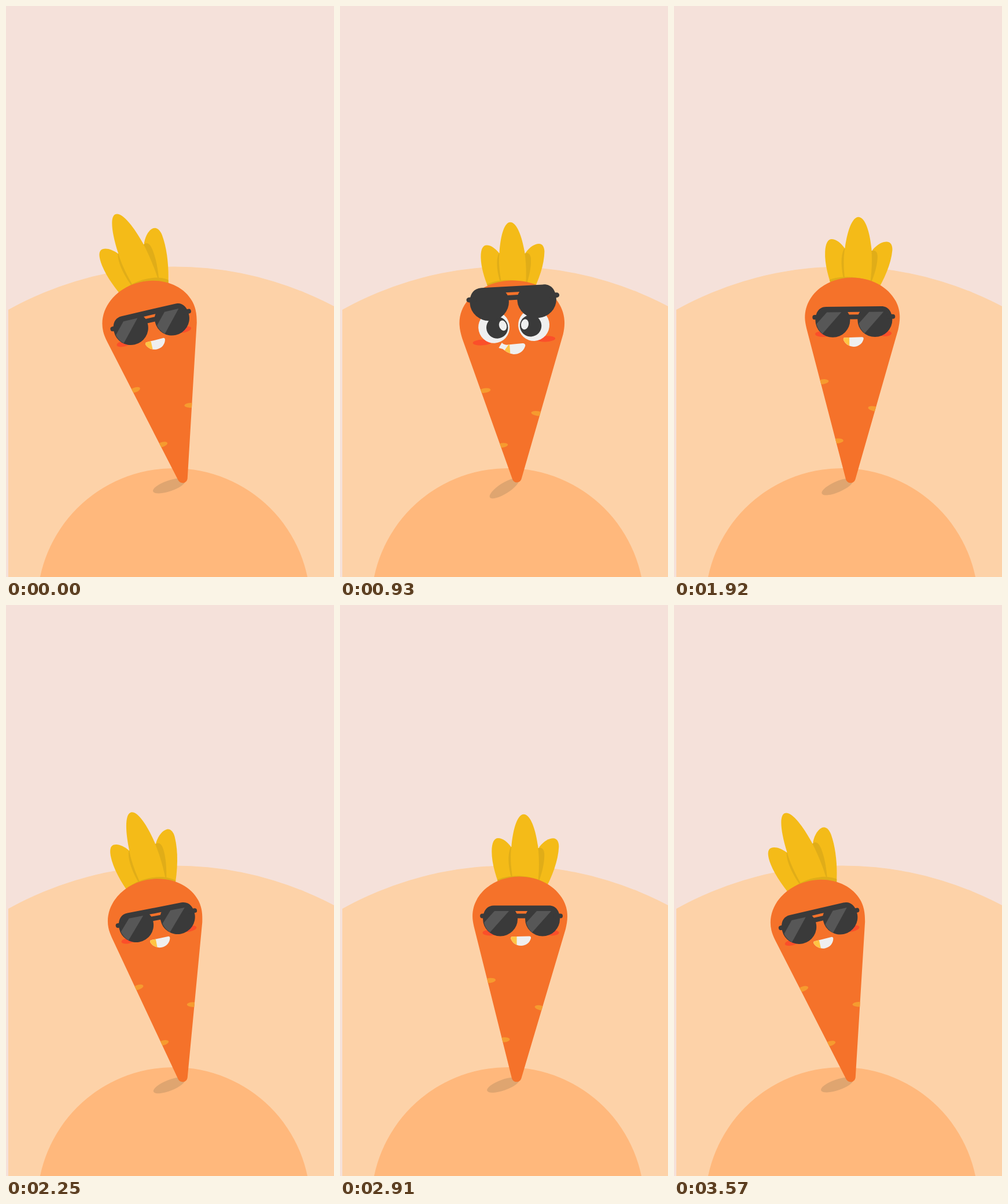
Animation, 567 px wide and 987 px high, one loop 3.6 s. Source, as an HTML page:

```html
<!DOCTYPE html>
<html lang="en">
<head>
<meta charset="utf-8">
<title>Dancing carrot</title>
<style>
  html, body { margin: 0; width: 100%; height: 100%; overflow: hidden; background: #f5e1da; }
  svg { display: block; width: 100vw; height: 100vh; }
</style>
</head>
<body>
<svg viewBox="0 0 567 987">
  <defs>
    <clipPath id="bodyClip"><path class="body"/></clipPath>
    <clipPath id="mouthClip"><path class="mouth"/></clipPath>
    <clipPath id="leafClip">
      <path id="leafL" d="M280 497C270 472 262 446 262 424C262 408 266 400 273 400C281 400 289 407 295 415C300 425 303 460 302 497Z"/>
      <path id="leafR" d="M340 497L344 416C352 405 361 400 368 400C375 400 378 407 378 415C377 440 367 469 352 497Z"/>
      <path id="leafM" d="M303 497C294 455 294 430 296 415C299 380 307 357 317 357C329 357 338 385 342 415C345 445 344 470 340 497Z"/>
    </clipPath>
    <clipPath id="hillClip"><path d="M4 0H567V987H4Z"/></clipPath>
    <g id="eye">
      <ellipse rx="27" ry="27.5" fill="#efefef"/>
      <circle cx="5.5" cy="1" r="18.7" fill="#3a3a3a"/>
      <ellipse cx="15.5" cy="-2" rx="6.5" ry="9" transform="rotate(-14 15.5 -2)" fill="#efefef"/>
    </g>
  </defs>

  <path fill="#f5e1da" d="M0 0H567V987H0Z"/>
  <circle cx="291" cy="1040.5" r="590" fill="#fdd2a8" clip-path="url(#hillClip)"/>
  <circle cx="290" cy="1035" r="236" fill="#ffb87c"/>
  <ellipse id="shadow" cx="-20" rx="29.5" ry="9.3" fill="#dfa570"/>

  <g id="carrot">
    <g id="leaves">
      <g fill="#f4bb18">
        <use href="#leafL"/>
        <use href="#leafR"/>
      </g>
      <g fill="#e0ad18">
        <path d="M295 416C289 428 290 452 298 478L302 478L298 415Z"/>
        <path d="M341 418C349 415 353 420 353 430C353 446 349 461 344 477L340 478Z"/>
      </g>
      <use href="#leafM" fill="#f4bb18"/>
      <path clip-path="url(#leafClip)" fill="#e0ad18" d="M262 481C282 465 318 465 342 474C352 478 360 484 366 492V500H262Z"/>
    </g>
    <path class="body" fill="#f5722a"/>
    <g clip-path="url(#bodyClip)">
      <g id="marks" fill="#f69b2f">
        <ellipse rx="10" ry="4.2" transform="translate(259 649) rotate(-6)"/>
        <ellipse rx="10.5" ry="4.2" transform="translate(347 696.5) rotate(12)"/>
        <ellipse rx="10" ry="4.2" transform="translate(283.5 751.5) rotate(-4)"/>
      </g>
    </g>
    <g fill="#fb4f2a">
      <ellipse class="blush" ry="5"/>
      <ellipse class="blush" ry="5"/>
    </g>
    <path class="mouth" fill="#efefef"/>
    <path id="tooth" fill="#ffc444" clip-path="url(#mouthClip)"/>
    <use class="eye" href="#eye"/>
    <use class="eye" href="#eye"/>
    <g id="glasses">
      <g fill="#3a3a3a">
        <path d="M247 543C247 530 253 519.5 266 519.5H361C374 519.5 380 530 380 543A30 29.5 0 0 1 320 543C320 538 321 533 324 529H303C306 533 307 538 307 543A30 29.5 0 0 1 247 543Z"/>
        <path d="M304 533.5H323V541.5H304Z"/>
        <rect x="242" y="533.5" width="16" height="8" rx="4"/>
        <rect x="369" y="533.5" width="16" height="8" rx="4"/>
      </g>
      <path id="gleam" fill="#575757" d="M267 529H292L259 566Q251 559 249 549ZM340 529H365L332 566Q324 559 322 549Z"/>
    </g>
  </g>
</svg>

<script>
const LOOP = 3600, STEP = 30, SWING = 1200;
const one = s => document.querySelector(s), all = s => [...document.querySelectorAll(s)];
const mix = (a, b, k) => a + (b - a) * k;
const clamp = x => Math.min(1, Math.max(0, x));
const wave = x => (1 - Math.cos(Math.PI * clamp(x))) / 2;
const set = (el, attrs) => { for (const a in attrs) el.setAttribute(a, attrs[a]); };

// Shapes as [at rest, peeking over the glasses]
const BODY = [
  'M297 818L231.5 556C230 549 229 544 229 538C229 500 265 469.5 310 469.5C356 469.5 393 500 393 538C393 546 391.5 553 390 560L313.5 818C311 826.5 299.5 826.5 297 818Z',
  'M297.8 817L225 570C223 562 221.5 555 221.5 546C221.5 506 262 474.5 313 474.5C363 474.5 403 508 403 549C403 558 401.5 565 399.5 572L313.5 818C311 825.5 300 825.5 297.8 817Z'];
const MOUTH = [
  'M295 576L296 573.5Q300 573 305.5 573L327 572.5Q330.5 572.5 330 576C328 584 321 589 313 589C304 589 297 583 295 576Z',
  'M287 589.5L293 581Q297.4 586.4 305.6 585L328.7 584Q333.7 584.5 333 588.6C329.5 598.3 321 602.6 312 602C303 600 297.6 595.4 294 592Z'];
const TOOTH = [
  'M290 570L305.5 570L305.5 592L290 592Z',
  'M305 584L306 584L306.5 604L294 598Z'];

function morph([a, b], k) {
  const end = b.match(/[\d.]+/g);
  let i = 0;
  return a.replace(/[\d.]+/g, n => mix(+n, +end[i++], k).toFixed(2));
}

// Sways between its right and left value; the second sway of the loop ends at `mid` instead
function sway(t, lag, right, left, mid) {
  const u = t - lag, second = Math.abs(u - SWING) < SWING / 2;
  return mix(right, second ? mid : left, (1 + Math.cos(2 * Math.PI * u / SWING)) / 2);
}

const peek = t => wave((SWING / 2 - Math.abs(t - SWING)) / 150);
// Leaves shoot up just before the squash
const spring = t => .13 * Math.exp(-(((t - 660) / 140) ** 2));
// Shadow swings out quickly and drifts back
const drift = t => t < 660 ? wave(t / 660) : ((LOOP - t) / (LOOP - 660)) ** 2.3;

const bodies = all('.body'), mouths = all('.mouth'), blushes = all('.blush'), eyes = all('.eye');
const [shadow, carrot, leaves, marks, tooth, glasses, gleam] =
  ['#shadow', '#carrot', '#leaves', '#marks', '#tooth', '#glasses', '#gleam'].map(one);

function draw(t) {
  const k = peek(t);
  set(shadow, { transform: `translate(301 823) rotate(${-19 - 16.5 * drift(t)})` });
  set(carrot, { transform: `rotate(${sway(t, 0, .77, -13.1, -6.1)} 305.5 816)` });

  const turn = sway(t, 100, 3.3, -10.2, -1.8);
  const tall = sway(t, 60, .936, 1.104, .845) + spring(t);
  set(leaves, {
    transform: `translate(${310 - k} ${478 + 4.5 * k}) rotate(${turn}) scale(${1 - .05 * k} ${tall}) translate(-310 -478)`
  });

  bodies.forEach(el => set(el, { d: morph(BODY, k) }));
  mouths.forEach(el => set(el, { d: morph(MOUTH, k) }));
  set(tooth, { d: morph(TOOTH, k) });
  set(marks, { transform: `translate(0 ${816 + 2.5 * k}) scale(1 ${1 - .062 * k}) translate(0 -816)` });

  blushes.forEach((el, i) => set(el, {
    cx: i ? mix(366, 369.3, k) : 259, cy: mix(566.5, 578.6, k), rx: mix(12.5, 16.3, k)
  }));

  const size = mix(.8, 1, k);
  eyes.forEach((el, i) => set(el, {
    transform: `translate(${i ? 349.8 : 280.8} ${mix(545, 553.5, k)}) scale(${i ? -size : size} ${size})`,
    visibility: k > 0 ? 'visible' : 'hidden'
  }));

  set(glasses, {
    transform: `translate(${313.5 + 2.8 * k} ${537.5 - 33.5 * k}) scale(${1 + .125 * k} ${1 + .085 * k}) translate(-313.5 -537.5)`
  });
  set(gleam, { opacity: 1 - k });
}

function tick() {
  draw(Math.floor(performance.now() % LOOP / STEP) * STEP);
  requestAnimationFrame(tick);
}
tick();
</script>
</body>
</html>
```
